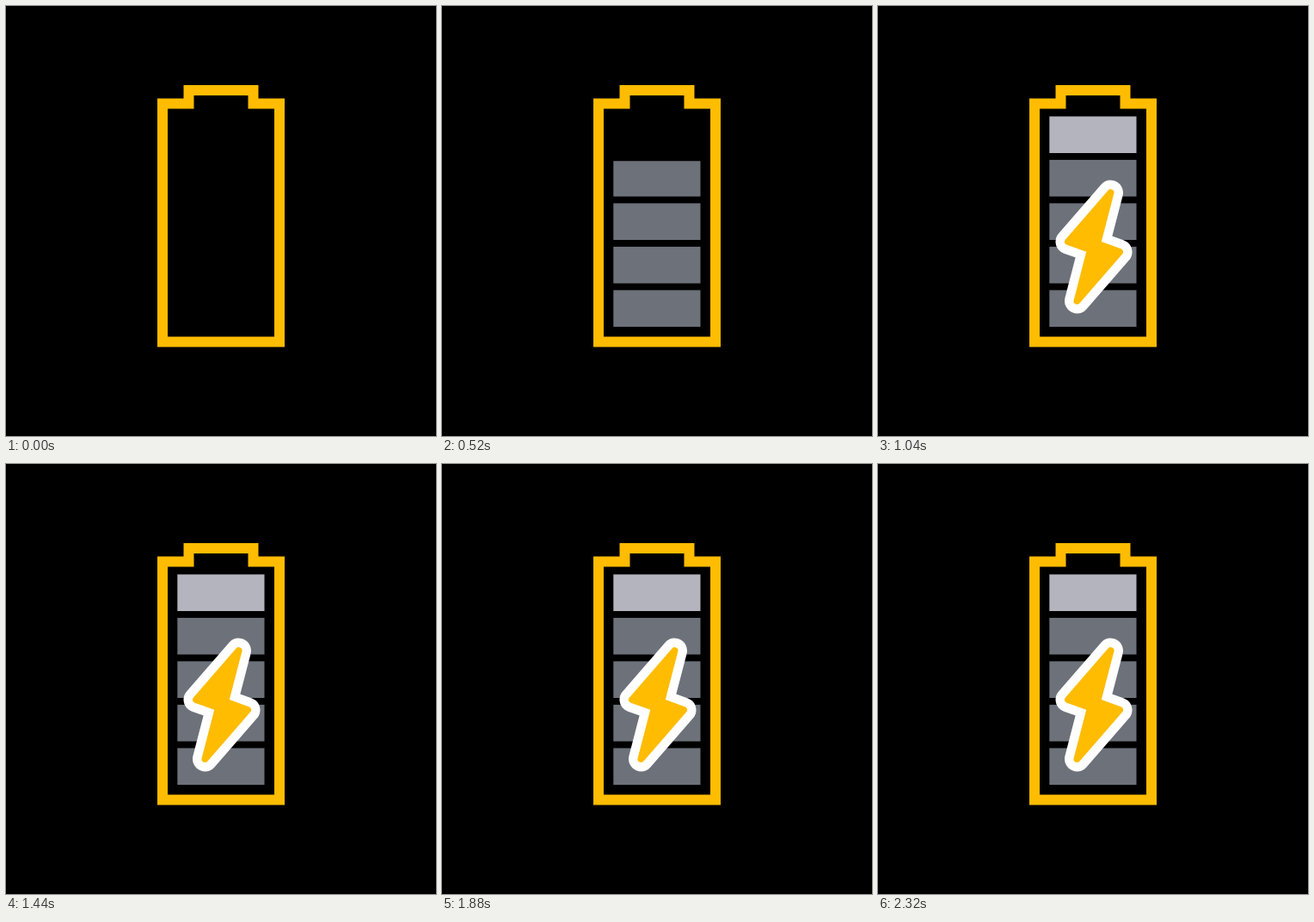
An HTML page for the animation above (3 s loop, 500 by 500 pixels).

```html
<!DOCTYPE html>
<html lang="en">
<head>
<meta charset="utf-8">
<title>Charging battery</title>
<style>
  html, body { margin: 0; width: 100%; height: 100%; overflow: hidden; background: #000; }
  svg { display: block; width: 100vw; height: 100vh; }
</style>
</head>
<body>
<svg viewBox="0 0 500 500">
  <defs>
    <clipPath id="level"><rect id="fill" x="190" y="373" width="120" height="0"/></clipPath>
    <path id="zap" d="M270.5 217 L221 274 L247 283.2 L231.5 343 L281 286 L255 276.5 Z" stroke-linejoin="round"/>
  </defs>
  <path d="M182 113.5 H212.5 V98 H287.5 V113.5 H318 V390.5 H182 Z" fill="none" stroke="#ffbc00" stroke-width="12"/>
  <g id="bars" clip-path="url(#level)"></g>
  <g id="bolt" visibility="hidden">
    <use href="#zap" fill="#fff" stroke="#fff" stroke-width="29"/>
    <use href="#zap" fill="#ffbc00" stroke="#ffbc00" stroke-width="8"/>
  </g>
</svg>
<script>
  const LOOP = 3000, STEP = 40, RISE = 680;
  const BOTTOM = 373, TOP = 128;
  const FLASHES = [[1040, 1240], [1440, 1680], [1880, 2120], [2320, 3000]];
  const get = id => document.getElementById(id);
  const fill = get('fill'), bolt = get('bolt'), bars = get('bars');

  for (let i = 0; i < 5; i++) {
    const bar = document.createElementNS('http://www.w3.org/2000/svg', 'rect');
    const attrs = { x: 199.3, y: 330.4 - i * 50.5, width: 101.2, height: 42.6, fill: i < 4 ? '#6c717a' : '#b3b4be' };
    for (const key in attrs) bar.setAttribute(key, attrs[key]);
    bars.append(bar);
  }

  // Gentle ease in and out
  const ease = p => p - 0.022 * Math.sin(2 * Math.PI * p);

  function draw(time) {
    const t = Math.floor((time % LOOP) / STEP) * STEP;
    const y = BOTTOM - (BOTTOM - TOP) * ease(Math.min(t / RISE, 1));
    fill.setAttribute('y', y);
    fill.setAttribute('height', BOTTOM - y);
    const lit = FLASHES.some(([from, to]) => t >= from && t < to);
    bolt.setAttribute('visibility', lit ? 'visible' : 'hidden');
  }

  const start = performance.now();
  function tick() {
    draw(performance.now() - start);
    requestAnimationFrame(tick);
  }
  tick();
</script>
</body>
</html>
```
